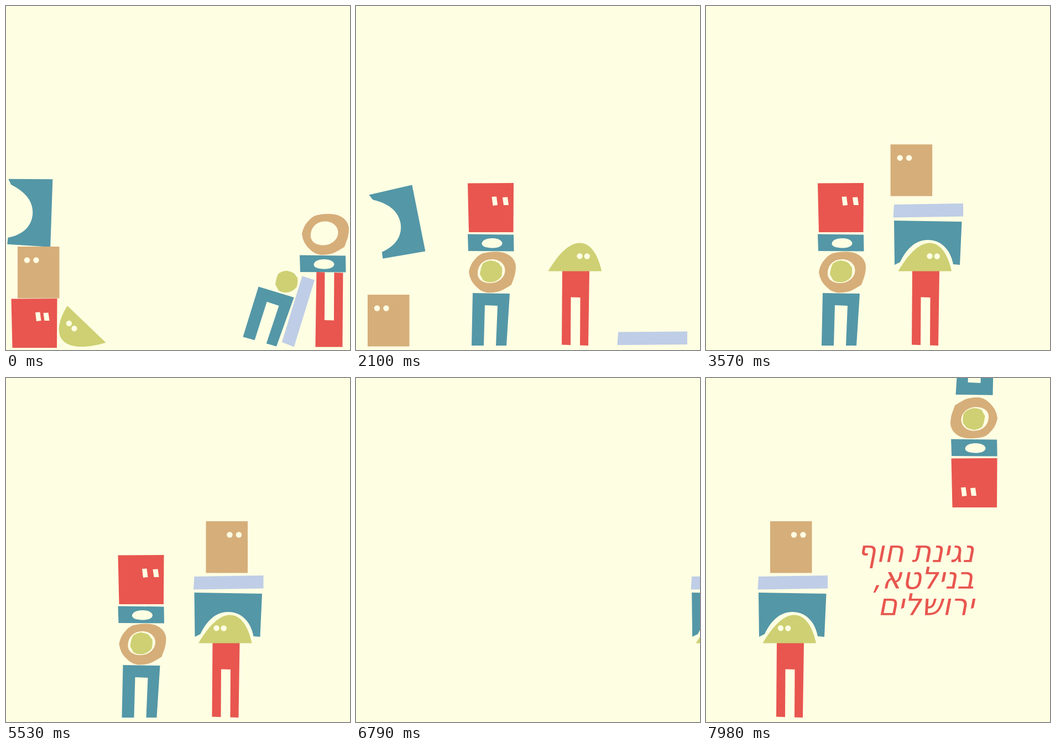
Recreate the animation shown at these times as an HTML page without scripts. Size 622 px wide and 622 px high, loop 8000 ms.

```html
<!DOCTYPE html>
<html lang="he">
<head>
<meta charset="utf-8">
<title>Building blocks</title>
<style>
  :root {
    --paper: #fefee3;
    --teal: #5497a7;
    --red: #e8564f;
    --tan: #d6ae7a;
    --green: #ced073;
    --lilac: #bfcde6;
  }
  html, body { margin: 0; width: 100%; height: 100%; overflow: hidden; background: var(--paper); }
  svg { display: block; width: 100vw; height: 100vh; }

  .teal { fill: var(--teal); }
  .red { fill: var(--red); }
  .tan { fill: var(--tan); }
  .green { fill: var(--green); }
  .lilac { fill: var(--lilac); }
  .hole { fill: var(--paper); }

  svg [class*="m-"] { animation: 8s ease-in-out infinite both; transform-origin: 0 0; }

  /* first figure; its head and belt are turned back while the figure hangs upside down */
  svg .m-pants { animation-name: pants; transform-origin: 242.5px 566.7px; }
  svg .m-ring { animation-name: ring; }
  svg .m-ball { animation-name: ball; }
  svg .m-belt { animation-name: belt; transform-origin: 243.7px 428px; }
  svg .m-head { animation-name: head; transform-origin: 243.5px 364.5px; }
  svg .m-head-eyes { animation-name: head-eyes; }
  svg .m-head-eye { animation-name: head-eye; }
  @keyframes pants {
    0%, 0.9% { translate: 231.2px -4.7px; rotate: 16deg; }
    7%, 82% { translate: 0 0; rotate: 0deg; }
    82.01%, 100% { translate: -1px 4px; rotate: 0deg; }
  }
  @keyframes ring {
    0%, 2% { translate: 331px -68.5px; }
    9%, 82% { translate: 0 0; }
    82.01%, 100% { translate: -2.5px 0.5px; }
  }
  @keyframes ball {
    0%, 3% { translate: 263px 18.5px; }
    10%, 100% { translate: 0 0; }
  }
  @keyframes belt {
    0%, 5% { translate: 329px 38px; rotate: 0deg; }
    12%, 82% { translate: 0 0; rotate: 0deg; }
    82.01%, 100% { translate: 0 0; rotate: 180deg; }
  }
  @keyframes head {
    0%, 18% { translate: -192.5px 209px; rotate: 0deg; }
    23.5%, 82% { translate: 0 0; rotate: 0deg; }
    82.01%, 100% { translate: 0 0; rotate: 180deg; }
  }
  @keyframes head-eyes {
    0%, 82% { translate: 0 0; }
    82.01%, 100% { translate: -26px 28px; }
  }
  @keyframes head-eye {
    0%, 18% { translate: -5px 0; }
    23.5%, 82% { translate: 0 0; }
    82.01%, 100% { translate: -2.5px 0; }
  }

  /* second figure */
  svg .m-legs { animation-name: legs; transform-origin: 396.7px 546px; }
  svg .m-arch { animation-name: arch; transform-origin: 400.5px 428.5px; }
  svg .m-dome { animation-name: dome; transform-origin: 395.5px 479.5px; }
  svg .m-dome-eyes { animation-name: dome-eyes; }
  svg .m-plank { animation-name: plank; transform-origin: 402px 369.5px; }
  svg .m-box { animation-name: box; }
  svg .m-box-eyes { animation-name: box-eyes; }
  @keyframes legs {
    0%, 12.5% { translate: 188px 3px; rotate: 180deg; animation-timing-function: ease-out; }
    14.875% { translate: 189px -82.5px; rotate: 137.4deg; animation-timing-function: linear; }
    18% { translate: 80px -110px; rotate: 60deg; animation-timing-function: ease-in; }
    21%, 100% { translate: 0 0; rotate: 0deg; }
  }
  @keyframes plank {
    0%, 13% { translate: 126px 182.5px; rotate: -72deg; animation-timing-function: ease-in; }
    14.875% { translate: 127.5px 194.5px; rotate: -62deg; animation-timing-function: ease-in; }
    18%, 33% { translate: 134px 231px; rotate: 0.5deg; animation-timing-function: ease-in; }
    37% { translate: 60px 100px; rotate: -6deg; animation-timing-function: ease-out; }
    41%, 100% { translate: 0 0; rotate: 0deg; }
  }
  @keyframes dome {
    0%, 19% { translate: -249.5px 96px; rotate: -136.3deg; animation-timing-function: ease-in; }
    22% { translate: -110px -20px; rotate: -60deg; animation-timing-function: ease-out; }
    25%, 100% { translate: 0 0; rotate: 0deg; }
  }
  @keyframes dome-eyes {
    0%, 19% { translate: 2px 6px; }
    25%, 60% { translate: 0 0; }
    62%, 100% { translate: -24.5px 0; }
  }
  @keyframes arch {
    0%, 22.5% { translate: -357.7px -55.5px; rotate: 91deg; animation-timing-function: ease-in; }
    24.5% { translate: -357.7px 31px; rotate: 91deg; animation-timing-function: ease-in; }
    26.25% { translate: -326.7px -36.5px; rotate: 78deg; animation-timing-function: ease-out; }
    29% { translate: -220px -140px; rotate: 45deg; animation-timing-function: linear; }
    31.5% { translate: -100px -146px; rotate: 15deg; animation-timing-function: ease-in; }
    34.5%, 100% { translate: 0 0; rotate: 0deg; }
  }
  @keyframes box {
    0%, 22.5% { translate: -340px 176px; animation-timing-function: ease-in; }
    24.5%, 40% { translate: -340px 263px; animation-timing-function: ease-in; }
    42% { translate: -245px 90px; animation-timing-function: linear; }
    43.6% { translate: -90px -21px; animation-timing-function: linear; }
    44.625% { translate: -28px -9px; animation-timing-function: ease-out; }
    45.6%, 100% { translate: 0 0; }
  }
  @keyframes box-eyes {
    0%, 55% { translate: 0 0; }
    57%, 100% { translate: 26px 0; }
  }

  /* both walk off right; one returns from the right, the other upside down from the top */
  svg .m-one { animation-name: one; animation-timing-function: linear; }
  svg .m-two { animation-name: two; animation-timing-function: linear; }
  svg .m-title { animation-name: title; animation-timing-function: linear; }
  @keyframes one {
    0%, 69.125% { translate: 0 0; rotate: 0deg; }
    80.5%, 82% { translate: 450px 0; rotate: 0deg; }
    82.01%, 92.9% { translate: 728.5px 318px; rotate: 180deg; }
    99.75%, 100% { translate: 728.5px 554px; rotate: 180deg; }
  }
  @keyframes two {
    0%, 69.125% { translate: 0 0; }
    80.5%, 84.8% { translate: 450px 0; }
    84.81% { translate: 269.8px 0; }
    99.75%, 100% { translate: -245px 0; }
  }
  @keyframes title {
    0%, 87% { translate: 440px 0; }
    99.75%, 100% { translate: 0 0; }
  }

  text {
    font: italic 500 54px "Open Sans", "DejaVu Sans", sans-serif;
    font-stretch: 88%;
    direction: rtl;
    fill: var(--red);
  }
</style>
</head>
<body>
<svg viewBox="0 0 622 622">
  <g class="m-one">
    <path class="m-pants teal" d="M211 519 278 520 272 614 253 614 256 542 233 541 231 614 209 614Z"/>
    <g class="m-ring">
      <path class="tan" d="M204 481C206 470 210 463 216 457Q224 447 235 446C246 444 258 443 270 447Q287 454 289 470 289 483 285 493L281 504Q272 510 262 515 251 519 238 518.500 227 517 219 509 206 498 204 481Z"/>
      <path class="hole" d="M220 482C221 466 233 458 246 458 259 458 269 466 269.500 477 270 491 257 501 243 501 229 501 219 494 220 482Z"/>
    </g>
    <path class="m-ball green" d="M224 485Q226 470 230 465 236 461 243 460 252 461 258 465L264 473Q265 481 263 489 257 497 248 499 238 501 230 496Z"/>
    <g class="m-belt">
      <path class="teal" d="M202 412.500 285 413.500 285.500 443.500 203 443Z"/>
      <path class="hole" d="M227.500 429C229 422 238 420 247 420 257 420 264 424 264.500 429 264 435 256 437.500 246 437.500 235 437 227 435 227.500 429Z"/>
    </g>
    <g class="m-head">
      <path class="red" d="M202 320.500 285 320 284.500 409 204 409Z"/>
      <g class="m-head-eyes hole">
        <path d="M245.500 345 254 344.500 256 360 247.500 361Z"/>
        <path class="m-head-eye" d="M265 346 274 345.500 276 360 267 360Z"/>
      </g>
    </g>
  </g>

  <g class="m-two">
    <path class="m-legs red" d="M373 478.500H422L420 614 405 613.500 405.500 527 388.500 526.500 388 613 372 612.500Z"/>
    <path class="m-arch teal" d="M340 388 462.500 390 459 468 447 467C442 440 425 423 401 423 378 423 362 440 351 463L341 468Z"/>
    <g class="m-dome">
      <path class="green" d="M347.500 479.500C363 453 383 429 404 428.500 425 428 438 451 444 479.500Z"/>
      <g class="m-dome-eyes hole">
        <circle cx="404.500" cy="452.300" r="5.200"/>
        <circle cx="417.800" cy="452.500" r="5.200"/>
      </g>
    </g>
    <path class="m-plank lilac" d="M340 359 465 357 465 380.500 338.500 382.500Z"/>
    <g class="m-box">
      <path class="tan" d="M361 259H436.500V352.500H361Z"/>
      <g class="m-box-eyes hole">
        <circle cx="378" cy="283.500" r="5.200"/>
        <circle cx="394.500" cy="283.500" r="5.200"/>
      </g>
    </g>
  </g>

  <g class="m-title">
    <text x="485" y="333">נגינת חוף</text>
    <text x="485" y="381">בנילטא,</text>
    <text x="485" y="429">ירושלים</text>
  </g>
</svg>
</body>
</html>
```
